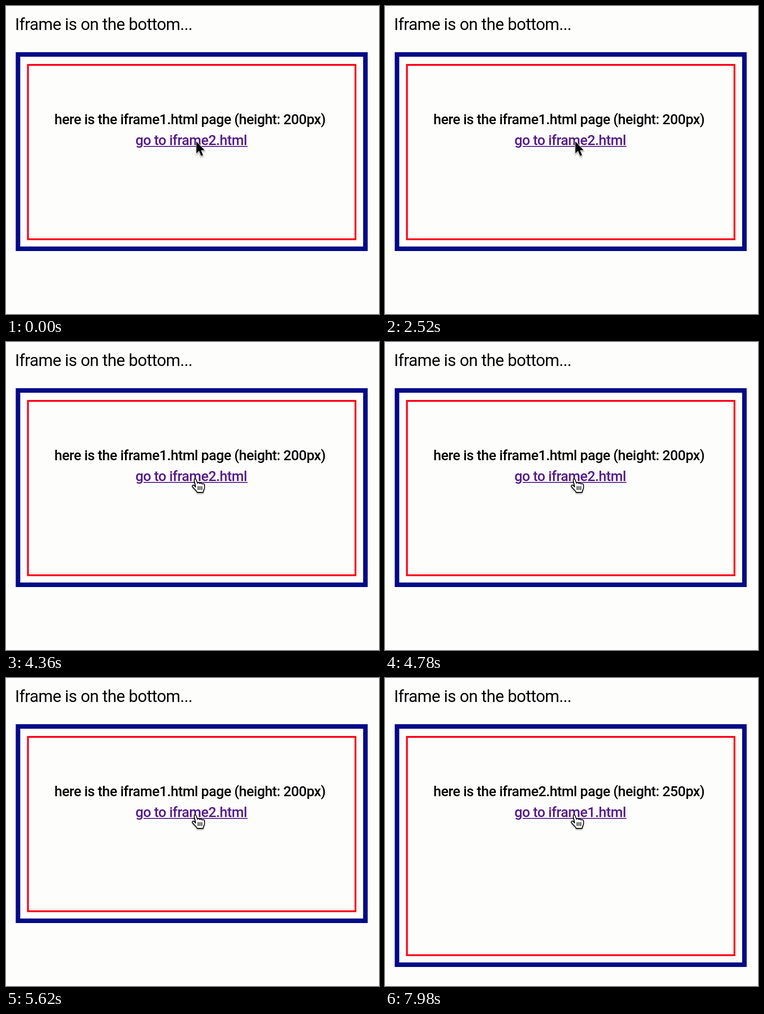
Write an HTML page that moves like this. It is 824 by 680 pixels and loops after 8000 ms.

```html
<!DOCTYPE html>
<html lang="en">
<head>
<meta charset="utf-8">
<title>Resizing iframe</title>
<style>
  html, body { margin: 0; width: 100%; height: 100%; overflow: hidden; background: #fdfdfc; }
  svg { display: block; }
  text { font-family: Roboto, "Noto Sans", sans-serif; }
  .title { font-size: 36.5px; letter-spacing: -.64px; }
  .body { font-size: 31px; font-weight: 500; letter-spacing: -.58px; }
  .link { fill: #551a8b; }
  .cursor { filter: drop-shadow(0 2px 1.5px #0006); }
</style>
</head>
<body>
<svg width="824" height="680" viewBox="0 0 824 680">
  <text class="title" x="20" y="53">Iframe is on the bottom...</text>
  <rect id="outer" x="26.5" y="107" width="767.5" fill="none" stroke="#000b87" stroke-width="10"/>
  <rect id="inner" x="48.5" y="130" width="723.5" fill="none" stroke="#ff0018" stroke-width="4"/>
  <text id="heading" class="body" x="107" y="261"></text>
  <text id="link" class="body link" x="286" y="307"></text>
  <rect class="link" x="304" y="309" width="229.5" height="2"/>
  <path id="arrow" class="cursor" d="M420.5 299V325.5L426.5 320L431 331L435.3 329.2L430.8 318.5H438.8Z"
    stroke="#fff" stroke-width="2" paint-order="stroke"/>
  <g id="hand" class="cursor" stroke="#000" stroke-width="1.8" stroke-linecap="round" stroke-linejoin="round">
    <path fill="#fff" d="M419 320L416 306C415 302 419 301 420.3 304.5L423 312
      C424 309.5 427.5 310 428 312.5C429.5 310.5 432.5 311 433 313.5
      C435.5 312 438.5 313 438.5 316V321C438.5 325 436 327 435.5 332H422.5
      C421 328 415 324 412 319.5C410.5 316.5 414 315 416 317Z"/>
    <path fill="none" d="M424.5 319V326M428.5 319V326M432.5 319V326"/>
  </g>
</svg>
<script>
  const LOOP = 8000, HOVER_AT = 4000, NAVIGATE_AT = 6060;
  const $ = id => document.getElementById(id);
  const show = (id, visible) => $(id).setAttribute("visibility", visible ? "visible" : "hidden");

  function render(t) {
    const second = t >= NAVIGATE_AT;
    const page = second ? 2 : 1;
    const growth = second ? 97 : 0;
    $("outer").setAttribute("height", 429 + growth);
    $("inner").setAttribute("height", 385 + growth);
    $("heading").textContent = `here is the iframe${page}.html page (height: ${second ? 250 : 200}px)`;
    $("link").textContent = `go to iframe${3 - page}.html`;
    show("arrow", t < HOVER_AT);
    show("hand", t >= HOVER_AT);
  }

  const start = performance.now();
  function tick() {
    render((performance.now() - start) % LOOP);
    requestAnimationFrame(tick);
  }
  tick();
</script>
</body>
</html>
```
